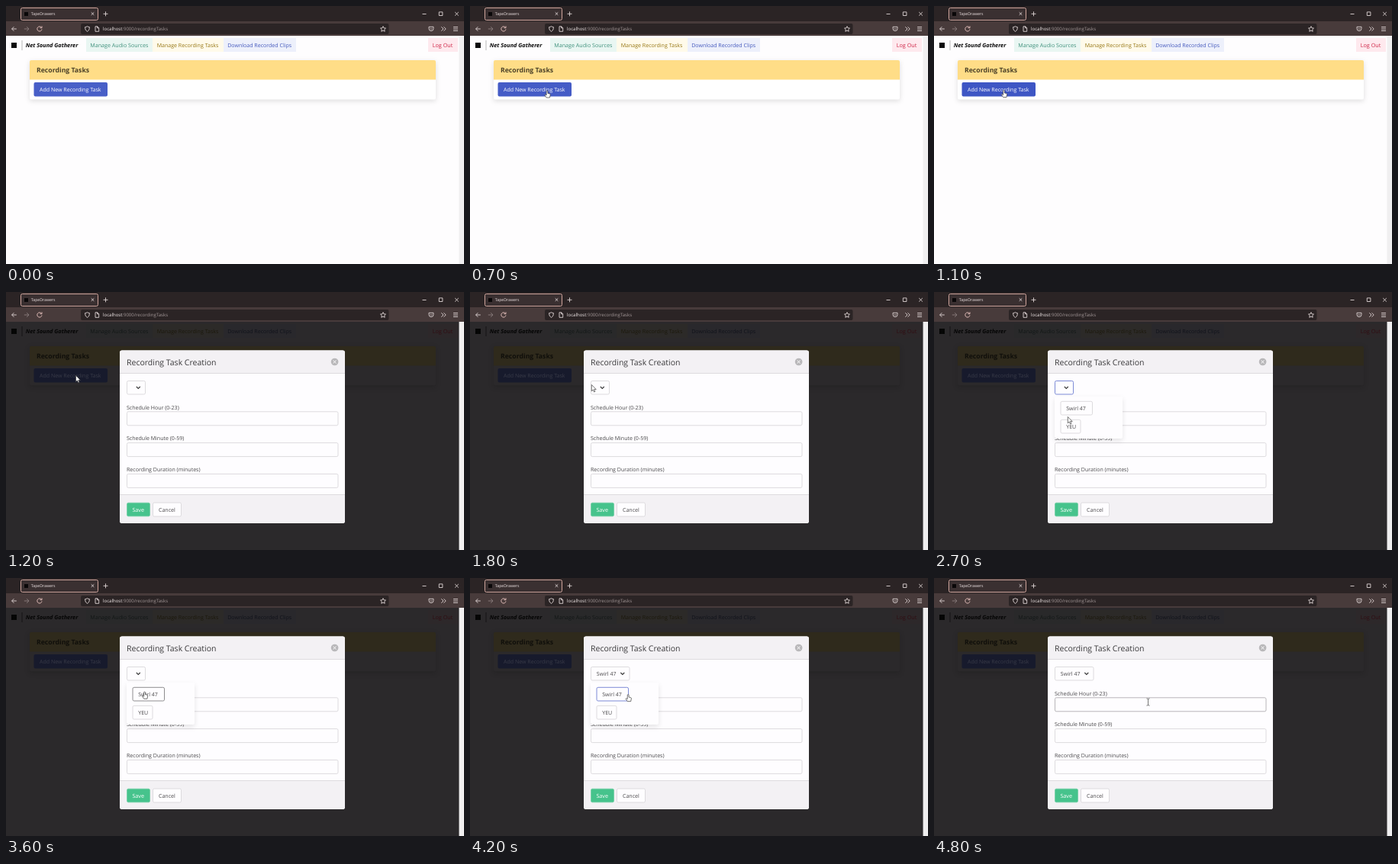
Animation of 600x338 px, one loop 5 s. Source, as an HTML page:

```html
<!DOCTYPE html>
<html lang="en">
<head>
<meta charset="utf-8">
<title>Recording Tasks</title>
<style>
html, body { margin: 0; width: 100%; height: 100%; overflow: hidden; background: #fefdfe; }
svg { display: block; width: 600px; height: 338px; }
text { font-family: "Open Sans", "Noto Sans", sans-serif; font-size: 7.05px; text-rendering: geometricPrecision; white-space: pre; }
.line { fill: none; stroke: #e0d6d6; stroke-width: .9; }
.field { fill: #fefdff; stroke: #dddbde; stroke-width: 1; }
.ink { fill: #4a494b; }
.white { fill: #fff; }

#page {
  --bg: #fefdfe; --brand: #0a0a0a; --rule: #b8b8b8; --card: #fff; --shade: rgba(10,10,10,.13);
  --audio: #3f917c; --audioBg: #e9f6f2; --tasks: #967714; --tasksBg: #fffaea;
  --clips: #4459bd; --clipsBg: #edf0fb; --out: #cf2748; --outBg: #fee9ee;
  --head: #ffdd87; --title: #4c4228; --label: #fff;
}
#page.dim {
  --bg: #2b292b; --brand: #050505; --rule: #161516; --card: #2b292b; --shade: rgba(10,10,10,.2);
  --audio: #131817; --audioBg: #29292a; --tasks: #1c190c; --tasksBg: #2c2a28;
  --clips: #11131b; --clipsBg: #29282c; --out: #310e13; --outBg: #2d282a;
  --head: #2f2a1c; --title: #100f0b; --label: #393b48;
}
#add { fill: #485fc7; }
.dim #add { fill: #171a2c; }
#card { fill: var(--card); filter: drop-shadow(0 2.5px 3px var(--shade)); }
#menu > rect { fill: #fefdff; filter: drop-shadow(0 3px 3px rgba(10,10,10,.1)); }
</style>
</head>
<body>
<svg viewBox="0 0 600 338" xmlns="http://www.w3.org/2000/svg">
  <g id="page">
    <rect y="39" width="600" height="299" fill="var(--bg)"/>
    <rect x="7" y="48" width="7" height="7" fill="var(--brand)"/>
    <path d="M21 45V58" stroke="var(--rule)"/>
    <text x="25.7" y="54" style="font-size:7.3px;font-weight:700;font-style:italic" fill="var(--brand)">Net Sound Gatherer</text>
    <rect x="105" y="42" width="87" height="18" fill="var(--audioBg)"/>
    <rect x="192" y="42" width="93" height="18" fill="var(--tasksBg)"/>
    <rect x="285" y="42" width="95" height="18" fill="var(--clipsBg)"/>
    <rect x="553" y="42" width="39" height="18" fill="var(--outBg)"/>
    <text x="110.3" y="53.7" fill="var(--audio)" style="font-size:7.15px">Manage Audio Sources</text>
    <text x="197.7" y="53.7" fill="var(--tasks)">Manage Recording Tasks</text>
    <text x="290.2" y="53.7" fill="var(--clips)">Download Recorded Clips</text>
    <text x="558.8" y="53.7" fill="var(--out)" style="font-size:7.2px">Log Out</text>
    <rect id="card" x="31" y="71" width="532" height="51.5" rx="2"/>
    <path d="M31 96.5V73q0-2 2-2H561q2 0 2 2V96.5Z" fill="var(--head)"/>
    <text x="40" y="87.3" style="font-size:8.7px;font-weight:700" fill="var(--title)">Recording Tasks</text>
    <rect id="add" x="36.5" y="100" width="96.5" height="18.5" rx="2"/>
    <text x="44" y="111.9" fill="var(--label)">Add New Recording Task</text>
  </g>
  <rect x="593.5" y="39" width="6.5" height="299" fill="#f0eff0"/>

  <g id="browser">
    <rect width="600" height="20" fill="#2b2425"/>
    <rect y="20" width="600" height="19" fill="#483b3b"/>
    <rect x="19.5" y="2.5" width="101" height="16" rx="2" fill="#3a3031" stroke="#cfa59d"/>
    <rect x="24" y="8" width="5" height="5" fill="#0a0809"/>
    <text x="32.8" y="12.3" style="font-size:5.2px" fill="#f0e6e6">TapeDrawers</text>
    <rect x="98" y="23" width="403.5" height="14" rx="2" fill="#2b2425"/>
    <text x="127" y="32.3" style="font-size:6.05px" fill="#f2eaea">localhost<tspan fill="#a39898">:9000/recordingTasks</tspan></text>
    <g class="line">
      <path d="M111.7 8.3l3.6 3.6m0-3.6l-3.6 3.6M127.5 10.3h6m-3-3v6"/>
      <path d="M545.5 10.5h5M567.3 7.9h4.6v4.6h-4.6zM588.2 8l4.6 4.6m0-4.6l-4.6 4.6"/>
      <path d="M13.8 30H7.6m2.8-2.8L7.6 30l2.8 2.8"/>
      <path d="M23.8 30H30m-2.8-2.8L30 30l-2.8 2.8" stroke="#8b7e7e"/>
      <path d="M46.4 28.1a3.1 3.1 0 1 0 .6 2.4M47 26.4v2.3h-2.4" stroke="#f0c9c4"/>
      <path d="M106.5 26.7q1.6 1 3 1q0 4.4-3 5.8q-3-1.4-3-5.8q1.4 0 3-1z"/>
      <path d="M117 26.8h2.8l1.9 1.9v4.6H117zM119.6 26.8v2.1h2.1"/>
      <path d="M494 26.6l1 2.2 2.5.3-1.8 1.7.5 2.5-2.2-1.2-2.2 1.2.5-2.5-1.8-1.7 2.5-.3z"/>
      <path d="M554 27.3h6v2.3a3 3 0 0 1-6 0zM555.6 29.2l1.4 1.4 1.4-1.4"/>
      <path d="M570.3 27.3l2.7 2.7-2.7 2.7m3.2-5.4l2.7 2.7-2.7 2.7"/>
      <path d="M586 27.6h6m-6 2.4h6m-6 2.4h6"/>
    </g>
  </g>

  <g id="modal">
    <rect x="149" y="76.4" width="295" height="226.6" rx="3" fill="#fefdff"/>
    <path d="M149 106.5V79.4q0-3 3-3H441q3 0 3 3V106.5Z" fill="#f3f1f4"/>
    <path d="M149 265.5V300q0 3 3 3H441q3 0 3-3V265.5Z" fill="#f3f1f4"/>
    <path d="M149 106.5H444M149 265.5H444" stroke="#dddbde"/>
    <text x="158" y="96" style="font-size:10.5px" fill="#3a393b">Recording Task Creation</text>
    <circle cx="430.6" cy="91.5" r="4.8" fill="#b9b8ba"/>
    <path d="M428.7 89.6l3.8 3.8m0-3.8l-3.8 3.8" stroke="#fff"/>
    <text class="ink" x="158" y="153.7">Schedule Hour (0-23)</text>
    <text class="ink" x="158" y="194.2">Schedule Minute (0-59)</text>
    <text class="ink" x="158" y="235">Recording Duration (minutes)</text>
    <rect id="hour" class="field" x="158.5" y="156.8" width="276.5" height="18" rx="1.8"/>
    <rect class="field" x="158.5" y="197.6" width="276.5" height="18" rx="1.8"/>
    <rect class="field" x="158.5" y="238.4" width="276.5" height="18" rx="1.8"/>
    <rect x="158.5" y="276.2" width="30" height="17.6" rx="1.8" fill="#46c38c" stroke="#74cfa6" stroke-width=".8"/>
    <text class="white" x="165.4" y="287.6" style="font-size:7.2px">Save</text>
    <rect class="field" x="192.5" y="276" width="37" height="18" rx="1.8"/>
    <text class="ink" x="200" y="287.6">Cancel</text>

    <rect id="trigger" class="field" x="158.5" y="116.5" width="24" height="17.5" rx="1.8"/>
    <text id="choice" class="ink" x="165.8" y="127.8">Swirl 47</text>
    <path id="chevron" d="M170.8 124l2.5 2.5 2.5-2.5" fill="none" stroke="#363636" stroke-width="1.1"/>

    <g id="menu">
      <rect x="158" y="137" width="89" height="55" rx="2"/>
      <g>
        <rect id="first" class="field" x="166" y="143.3" width="41.5" height="17.7" rx="1.8"/>
        <text class="ink" x="173.2" y="154.7">Swirl 47</text>
      </g>
      <g>
        <rect id="second" class="field" x="166" y="167.3" width="26" height="17.7" rx="1.8"/>
        <text class="ink" x="173.2" y="178.7">YEU</text>
      </g>
    </g>
  </g>

  <g id="pointer" stroke="#3a3a3a" stroke-width=".7" fill="#fff">
    <path id="arrow" d="M0 0V8.3L1.9 6.6 3.2 9.5 4.6 8.9 3.3 6.1H5.9Z"/>
    <path id="hand" d="M-.9.4Q0-.6.9.4V3.4L3.4 4Q4.3 4.3 4.2 5.3L3.5 9H-.9L-3.1 5.7Q-2.7 4.6-1.7 5.3L-.9 6Z"/>
    <path id="beam" d="M-2-4.5H-.6L0-4 .6-4.5H2M0-4V4M-2 4.5H-.6L0 4 .6 4.5H2" fill="none"/>
  </g>
</svg>
<script>
const LOOP = 5000, STEP = 100;
const OPEN = 1200, FOCUS = 2100, PRESS = 3600, PICK = 3700;
const BLUE = "#7c8ad6", GREY = "#dddbde", HOVER = "#b8b6b9", PRESSED = "#8e8d8f";
const $ = id => document.getElementById(id);

// time, x, y of the pointer tip
const path = [
  [700, 101, 111], [900, 91.5, 110.5], [1100, 91.5, 110.5], [1200, 91.5, 109.3], [1400, 91.5, 109.3],
  [1800, 159.3, 121.5], [2000, 171, 123], [2400, 171, 123], [2700, 175.3, 163.5], [2900, 178, 175],
  [3000, 178, 175], [3300, 181.5, 149.2], [4000, 181.5, 149.2], [4600, 280.5, 162.5], [5000, 280.5, 162.5]
];

const clamp = v => Math.min(1, Math.max(0, v));

function tip(t) {
  const i = Math.max(1, path.findIndex(p => p[0] >= t));
  const [t0, x0, y0] = path[i - 1], [t1, x1, y1] = path[i];
  const k = clamp((t - t0) / (t1 - t0));
  const e = k * k * (3 - 2 * k);
  return [x0 + (x1 - x0) * e, y0 + (y1 - y0) * e];
}

const show = (id, on) => { $(id).style.display = on ? "" : "none"; };
const edge = (id, color) => { $(id).style.stroke = color; };

function draw(t) {
  const [x, y] = tip(t);
  const within = (l, top, r, b) => x >= l && x <= r && y >= top && y <= b;
  const dim = t >= OPEN, picked = t >= PICK;
  const focused = t >= FOCUS && t < PRESS;

  $("page").classList.toggle("dim", dim);
  show("modal", dim);
  const warm = clamp((t - 600) / 300);
  $("add").style.fill = dim ? "" : `rgb(${72 - 10 * warm},${95 - 9 * warm},${199 - 3 * warm})`;

  const menu = t >= 1900 && x < 247;
  const onTrigger = dim && within(160, 116, picked ? 209 : 183, 134);
  const onFirst = menu && within(166, 143, 208, 161);
  const onSecond = menu && within(166, 167, 192, 185);
  const onHour = dim && !menu && within(158, 156, 435, 175);

  show("menu", menu);
  show("choice", picked);
  $("trigger").setAttribute("width", picked ? 50.5 : 24);
  $("chevron").setAttribute("transform", `translate(${picked ? 26.5 : 0})`);
  edge("trigger", focused ? BLUE : onTrigger ? HOVER : GREY);
  edge("first", picked ? BLUE : t >= PRESS ? PRESSED : onFirst ? HOVER : GREY);
  edge("second", onSecond ? HOVER : GREY);
  edge("hour", onHour ? HOVER : GREY);

  const hand = !dim || onTrigger || onFirst || onSecond;
  show("pointer", t >= path[0][0]);
  show("hand", hand);
  show("beam", onHour);
  show("arrow", !hand && !onHour);
  $("pointer").setAttribute("transform", `translate(${x} ${y})`);
}

const start = performance.now();
function tick() {
  const t = (performance.now() - start) % LOOP;
  draw(Math.floor(t / STEP) * STEP);
  requestAnimationFrame(tick);
}
tick();
</script>
</body>
</html>
```
